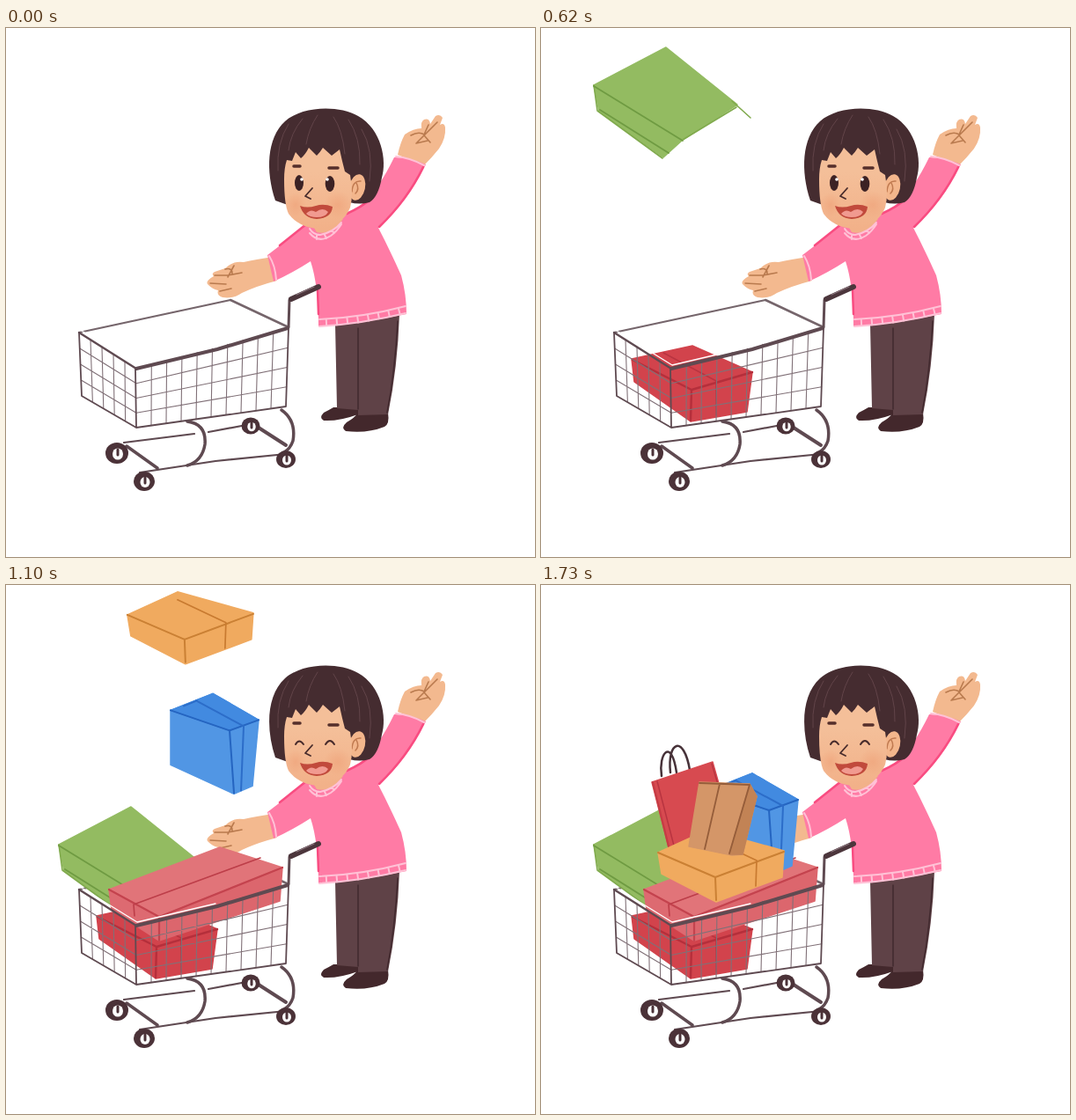
An HTML page for the animation above (1.9 s loop, 601x601 px).

```html
<!DOCTYPE html>
<html lang="en">
<head>
<meta charset="utf-8">
<title>Filling the cart</title>
<style>
html, body { margin: 0; width: 100%; height: 100%; overflow: hidden; background: #fff; }
svg { display: block; width: 100vw; height: 100vh; }
.line { fill: none; stroke-linecap: round; stroke-linejoin: round; }
</style>
</head>
<body>
<svg viewBox="0 0 601 601">
  <defs>
    <linearGradient id="face" x1="0" y1="0" x2="0" y2="1">
      <stop offset=".3" stop-color="#f4bf99"/><stop offset="1" stop-color="#f2b189"/>
    </linearGradient>
    <radialGradient id="cheek">
      <stop offset="0" stop-color="#ee9f76" stop-opacity=".55"/><stop offset="1" stop-color="#ee9f76" stop-opacity="0"/>
    </radialGradient>
  </defs>

  <g id="person">
    <!-- legs -->
    <path fill="#43282c" d="M372 431Q367 434 361 437Q355 443 361 446Q378 447 400 439V431ZM400 437Q396 443 387 448Q380 454 386 458Q410 461 430 453Q436 450 434 437Z"/>
    <path fill="#5f4247" d="M374 336L447 325Q445 385 434 439L400 440V434L376 432Z"/>
    <path class="line" stroke="#432b30" stroke-width="1.6" d="M400 341L400 433M445 333Q442 390 433 437"/>
    <!-- hands -->
    <g fill="#f3b98f">
      <path d="M304 260Q283 263 270 266Q258 264 249 273L237 277Q233 279 236 282Q225 288 230 292Q235 297 241 298Q239 304 246 306Q258 308 268 301Q285 293 308 287Z"/>
      <path d="M445 144Q448 130 453 121Q463 114 472 114Q471 106 475 104Q481 102 482 109L488 100Q493 97 496 102L493 110Q498 107 499 113Q500 125 492 137Q484 147 475 156Z"/>
    </g>
    <path class="line" stroke="#b97a4e" stroke-width="1.6" d="M237 281L252 281L268 278M232 290L250 291M243 299L256 296M249 274Q257 272 257 279M252 283L259 270M460 122Q469 117 475 121L480 110M467 130L475 122L490 107M475 122L482 130M466 131L479 128"/>
    <!-- sweater -->
    <path fill="#ff7ba5" d="M297 258Q320 241 344 221Q375 220 404 201Q423 184 441 147Q458 147 477 155Q456 199 423 227Q435 250 449 281Q455 303 455 325Q404 336 355 339Q355 292 346 265Q326 278 304 288Z"/>
    <path class="line" stroke="#f94c81" stroke-width="2.5" d="M311 247L341 223M387 211Q405 203 414 194M474 158Q456 195 424 226M355 325L354 298"/>
    <path class="line" stroke="#ffc2d6" stroke-width="2" d="M299 259Q306 270 307 286M443 146Q458 147 475 156M356 331Q405 329 454 316M356 339Q405 336 454 324"/>
    <path fill="none" stroke="#ffc2d6" stroke-width="8" stroke-dasharray="2 10" d="M363 335Q405 333 453 320"/>
    <path fill="#f2b189" d="M347 222L383 217Q369 236 353 232Z"/>
    <path class="line" stroke="#ffc2d6" stroke-width="2" d="M345 228Q349 235 357 235Q372 232 381 221M345 233Q355 245 369 236Q376 231 381 223M353 236V240M362 235L364 239M370 230L373 233"/>
    <!-- head -->
    <path fill="#452c30" d="M306 196C295 163 296 125 317 106C336 89 377 87 400 100C427 115 433 151 427 170Q423 192 413 198Q402 201 390 198L320 201Z"/>
    <path class="line" stroke="#624449" stroke-width="1" d="M321 109Q307 131 309 162M337 103Q323 120 321 139M354 99Q344 114 341 132M372 101Q382 115 385 143M389 104Q403 125 402 155M404 115Q418 138 413 174"/>
    <ellipse cx="399" cy="181" rx="9" ry="15" fill="#f3b68c" transform="rotate(12 399 181)"/>
    <path class="line" stroke="#c07a50" stroke-width="1.5" d="M393 186Q394 173 403 174M398 176Q402 183 397 188"/>
    <path fill="url(#face)" d="M316 172Q316 159 319 150L325 151L329 141L335 148Q340 144 344 136L353 145Q357 141 360 136L370 145L379 138Q382 152 385 163L391 167Q395 190 391 204Q382 226 354 228Q332 226 321 211Q316 200 316 172Z"/>
    <ellipse cx="329" cy="201" rx="12" ry="14" fill="url(#cheek)"/>
    <ellipse cx="377" cy="201" rx="16" ry="16" fill="url(#cheek)"/>
    <path class="line" stroke="#552f2b" stroke-width="3.5" d="M327 157L334 157M367 159L377 159"/>
    <path class="line" stroke="#472b2b" stroke-width="1.8" d="M348 182L340 191L346 194"/>
    <path fill="#c14a3c" d="M334 202Q342 205 352 202Q361 199 371 203Q370 216 353 217Q338 216 334 202Z"/>
    <path fill="#f19a90" d="M341 211Q346 205 352 209Q360 203 366 209Q363 215 353 215Q345 215 341 211Z"/>
    <g id="openEyes" fill="#3c2224">
      <ellipse cx="333" cy="176" rx="5" ry="9"/><ellipse cx="368" cy="177" rx="5.3" ry="9"/>
      <g fill="#fff"><circle cx="336" cy="172" r="1.8"/><circle cx="365" cy="172" r="1.8"/></g>
    </g>
    <path id="closedEyes" class="line" stroke="#472b2b" stroke-width="2" d="M329 181Q333 174 338 181M363 181Q368 173 373 181"/>
  </g>

  <g class="line" stroke="#75656b">
    <path stroke-width="2" d="M83 346L255 309"/><path stroke-width="2.5" d="M255 309L321 340"/>
  </g>

  <g id="goods"></g>

  <g class="line" stroke="#5f4a51">
    <path id="mesh" stroke="#807077" stroke-width="1.1"/>
    <path stroke-width="1.8" d="M83 346L86 418L148 454L147 387M148 454L318 430L321 341"/>
    <path stroke-width="2.4" d="M83 346L148 387"/>
    <path stroke-width="4" d="M148 387L240 365L320 341"/>
    <path stroke="#fff" stroke-width="1.3" d="M86 344L149 383L238 362"/>
    <path stroke-width="3" d="M321 340L322 309"/>
    <path stroke="#4c363c" stroke-width="6" d="M324 308L355 294"/>
    <path stroke="#89747c" stroke-width="1.2" d="M330 303L350 294"/>
    <path stroke-width="2.2" d="M134 471L214 461M230 459L273 451M152 505L238 492L318 484"/>
    <path stroke-width="3.5" d="M206 447Q228 450 226 473Q223 492 206 497M313 434Q330 446 326 469Q323 478 316 482M137 475L172 500"/>
    <path stroke-width="4" d="M276 447L318 474"/>
    <g id="wheels"></g>
  </g>
</svg>
<script>
const $ = id => document.getElementById(id);
const face = (points, fill) => `<polygon points="${points}" fill="${fill}" stroke="${fill}" stroke-width="1.5" stroke-linejoin="round"/>`;
const line = (d, color, width = 2) => `<path class="line" d="${d}" stroke="${color}" stroke-width="${width}"/>`;

// Back to front; land: touchdown in ms, drift: sideways shift per pixel of height.
const goods = [
  { land: 490, drift: .045, art:
    face('103,376 172,361 240,391 234,436 170,447 106,402', '#d2434c') +
    line('M104 377L171 411L240 391M171 411L170 446', '#b52f3b', 2.4) +
    line('M139 369L199 401L199 440', '#b93440', 1.6) },
  { land: 754.5, drift: 0, art:
    face('60,295 142,252 223,317 161,357 139,377 66,325', '#93bb61') +
    line('M60 295L64 324L138 378', '#80aa4d', 1.6) +
    line('M60 296L161 358M67 323L145 372', '#6f9b42', 1.8) +
    line('M161 357L222 320M217 313L238 332', '#80aa4d', 1.6) },
  { land: 918.7, drift: -.045, art:
    face('117,346 243,298 314,321 174,377', '#e17479') +
    face('117,346 174,377 174,404 120,369', '#dd6a71') +
    face('174,377 314,321 311,359 174,404', '#dc666d') +
    line('M117 346L174 377L314 321M174 377V404', '#c4434e', 2.2) +
    line('M145 363L289 310M145 363L146 376', '#bd3e49', 1.6) },
  { land: 1153, drift: .055, art:
    face('192,233 240,214 292,244 285,319 264,328 192,295', '#5196e4') +
    face('192,233 240,214 292,244 259,256', '#428ae0') +
    line('M192 233L259 256L292 244M259 256L264 327', '#2565c1') +
    line('M221 222L275 251L272 324M207 228L222 222', '#2c6dc9', 2) },
  { land: 1430, drift: 0, art:
    line('M137 217C133 192 148 172 154 213M147 213C143 178 162 169 169 210', '#473239', 2.5) +
    face('126,224 195,201 216,275 190,290 145,298', '#d74a50') +
    line('M127 224L145 297', '#c63c45', 2.2) +
    line('M132 223L151 296M194 203L215 274', '#b83440', 1.5) },
  { land: 1258, drift: -.018, art:
    face('133,304 190,278 276,302 274,332 199,360 137,328', '#f0aa5f') +
    line('M133 304L198 332L276 303M198 332L199 358', '#ca8034', 2) +
    line('M190 287L245 313L244 342', '#c87a30', 1.7) },
  { land: 1730, drift: 0, speed: 1.28, art:
    face('180,224 237,226 245,240 229,306 217,307 168,297', '#d49668') +
    face('237,226 245,240 229,306 214,306', '#c28355') +
    line('M180 225L237 227L214 305M203 226L186 300', '#955d3a', 1.8) },
];
$('goods').innerHTML = goods.map(item => `<g>${item.art}</g>`).join('');
const nodes = [...$('goods').children];

// Wires across one panel, given its corners: top left, top right, bottom right, bottom left.
function wires([a, b, c, d], columns, rows) {
  const mix = (p, q, k) => p.map((v, i) => (v + (q[i] - v) * k).toFixed(1));
  let path = '';
  for (let i = 1; i < columns; i++) path += `M${mix(a, b, i / columns)}L${mix(d, c, i / columns)}`;
  for (let i = 1; i < rows; i++) path += `M${mix(a, d, i / rows)}L${mix(b, c, i / rows)}`;
  return path;
}
const corner = [148, 387], foot = [148, 454];
$('mesh').setAttribute('d',
  wires([[83, 346], corner, foot, [86, 418]], 5, 4) +
  wires([corner, [321, 341], [318, 430], foot], 10, 4));

$('wheels').innerHTML = [[126, 483, 12], [157, 515, 11], [278, 452, 9.5], [318, 490, 10]].map(([x, y, r]) =>
  `<ellipse cx="${x}" cy="${y}" rx="${r + 1}" ry="${r}" fill="#4b3238" stroke="none"/>
   <ellipse cx="${x + 1}" cy="${y + 1}" rx="${r * .5}" ry="${r * .55}" fill="#fff" stroke="none"/>
   ${line(`M${x + 1} ${y - 4}V${y + 2}`, '#4b3238', 3)}`).join('');

const LOOP = 1900, START = 230, STEP = 30, SPEED = 1.71, SMILE = 770;
function draw() {
  const time = performance.now() % LOOP;
  const clock = START + Math.floor((time - START) / STEP) * STEP;
  goods.forEach(({ land, drift, speed = SPEED }, i) => {
    const y = Math.min(0, (clock - land) * speed);
    nodes[i].setAttribute('transform', `translate(${y * drift} ${y})`);
  });
  const smiling = clock >= SMILE;
  $('openEyes').style.display = smiling ? 'none' : '';
  $('closedEyes').style.display = smiling ? '' : 'none';
  requestAnimationFrame(draw);
}
draw();
</script>
</body>
</html>
```
